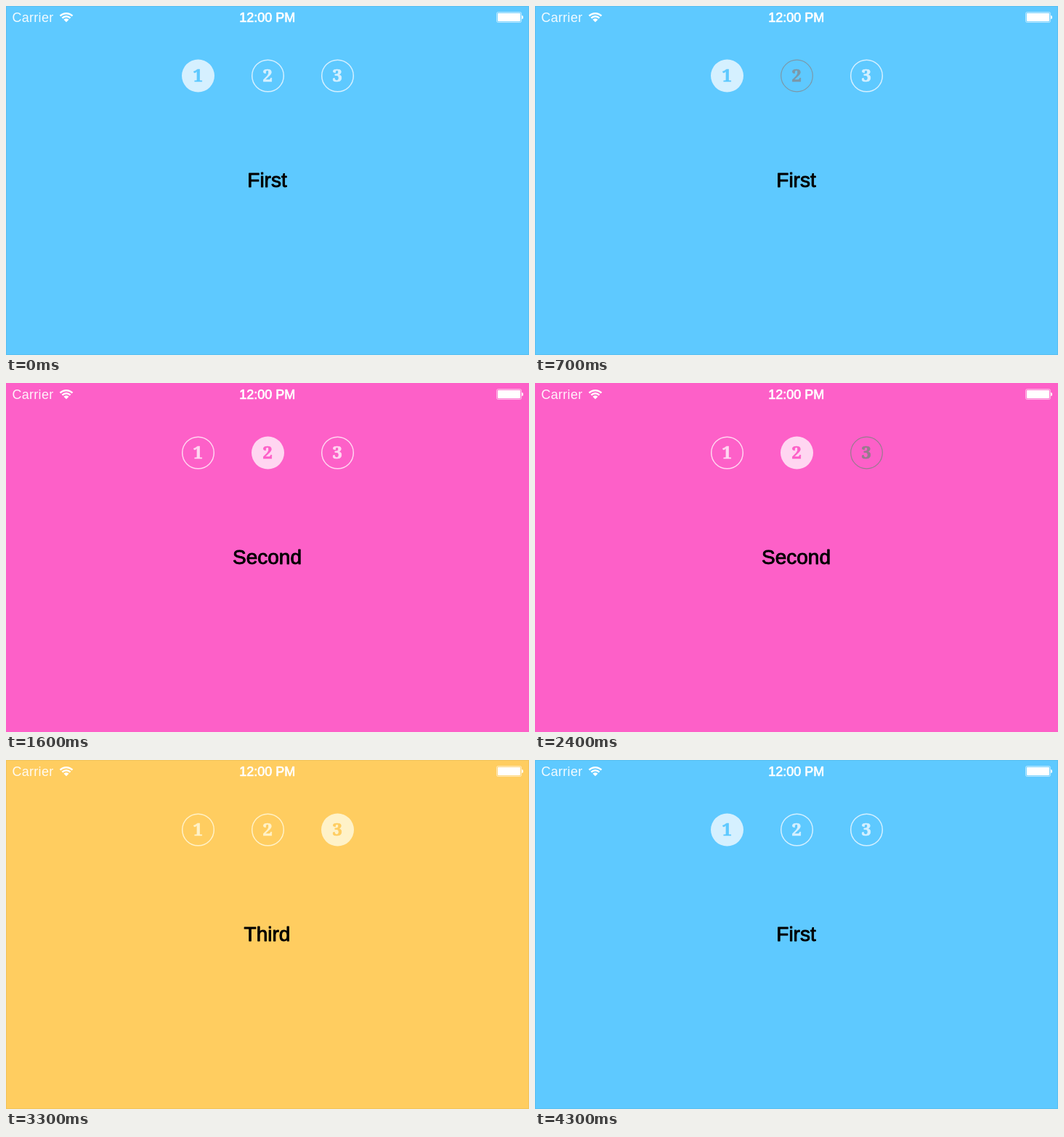
These frames come from a looping animation (720x480 px, 5.3 s). An HTML page with a canvas:

```html
<!DOCTYPE html>
<html lang="en">
<head>
<meta charset="utf-8">
<title>Tab switcher</title>
<style>
  html, body { margin: 0; width: 100%; height: 100%; overflow: hidden; }
  canvas { display: block; width: 720px; height: 480px; }
</style>
</head>
<body>
<canvas id="stage" width="720" height="480"></canvas>
<script>
const ctx = document.getElementById('stage').getContext('2d');
const LOOP = 5300;
const SANS = '"Liberation Sans", Arial, sans-serif';
const SERIF = '"Noto Serif", serif';

const PAGES = [
  { label: 'First', bg: '#5ec9ff', tint: '#d5f0ff', pressed: '#7b98a9', edge: 0.05 },
  { label: 'Second', bg: '#fd60c8', tint: '#ffd6f1', pressed: '#967b8d', edge: 0 },
  { label: 'Third', bg: '#ffcd60', tint: '#fff2c8', pressed: '#a58e5c', edge: 0.05 }
];

// Each step: start time, visible page, tab being pressed (-1 for none)
const STEPS = [
  [0, 0, -1], [700, 0, 1],
  [800, 1, -1], [2400, 1, 2],
  [2500, 2, -1], [4100, 2, 0],
  [4300, 0, -1]
];

function text(str, x, y, font, color, align, weight = 0) {
  ctx.font = font;
  ctx.textAlign = align;
  ctx.fillStyle = ctx.strokeStyle = color;
  ctx.fillText(str, x, y);
  if (weight) {
    ctx.lineWidth = weight;
    ctx.lineJoin = 'round';
    ctx.strokeText(str, x, y);
  }
}

function box(x, y, w, h, r) {
  ctx.beginPath();
  ctx.roundRect(x, y, w, h, r);
}

function drawWifi(x, y) {
  const from = -Math.PI * 0.75, to = -Math.PI * 0.25;
  ctx.strokeStyle = ctx.fillStyle = '#fff';
  ctx.lineWidth = 2.5;
  for (const r of [12, 7.9]) {
    ctx.beginPath();
    ctx.arc(x, y, r, from, to);
    ctx.stroke();
  }
  ctx.beginPath();
  ctx.moveTo(x, y);
  ctx.arc(x, y, 5, from, to);
  ctx.fill();
}

function drawBattery() {
  ctx.strokeStyle = 'rgba(255,255,255,0.55)';
  ctx.lineWidth = 1;
  box(675.5, 8.5, 34, 14, 2);
  ctx.stroke();
  ctx.fillStyle = '#fff';
  box(676.8, 9.8, 31.4, 11.4, 1);
  ctx.fill();
  box(710.2, 13, 1.8, 5, [0, 2, 2, 0]);
  ctx.fill();
}

function drawStatusBar() {
  ctx.letterSpacing = '0.3px';
  text('Carrier', 8.4, 22, `18px ${SANS}`, 'rgba(255,255,255,0.92)', 'left');
  ctx.letterSpacing = '0px';
  text('12:00 PM', 359.7, 22, `18px ${SANS}`, '#fff', 'center', 0.7);
  drawWifi(83, 22.2);
  drawBattery();
}

function drawTab(i, page, active, pressed) {
  const x = 264.5 + i * 96, y = 96;
  const color = pressed ? page.pressed : page.tint;
  ctx.beginPath();
  if (active) {
    ctx.arc(x, y, 22.5, 0, Math.PI * 2);
    ctx.fillStyle = color;
    ctx.fill();
  } else {
    ctx.arc(x, y, 21.8, 0, Math.PI * 2);
    ctx.strokeStyle = color;
    ctx.lineWidth = pressed ? 1.2 : 1.5;
    ctx.stroke();
  }
  text(i + 1, x - 0.3, 104, `900 24px ${SERIF}`, active ? page.bg : color, 'center', 0.7);
}

function draw(now) {
  const t = now % LOOP;
  const [, current, pressed] = STEPS.findLast(step => step[0] <= t);
  const page = PAGES[current];

  ctx.fillStyle = page.bg;
  ctx.fillRect(0, 0, 720, 480);
  ctx.strokeStyle = `rgba(0,0,0,${page.edge})`;
  ctx.lineWidth = 1;
  ctx.strokeRect(0.5, 0.5, 719, 479);

  drawStatusBar();
  PAGES.forEach((_, i) => drawTab(i, page, i === current, i === pressed));
  text(page.label, 359.5, 249, `28px ${SANS}`, '#000', 'center', 0.9);
}

const start = performance.now();
function tick() {
  draw(performance.now() - start);
  requestAnimationFrame(tick);
}
tick();
</script>
</body>
</html>
```
